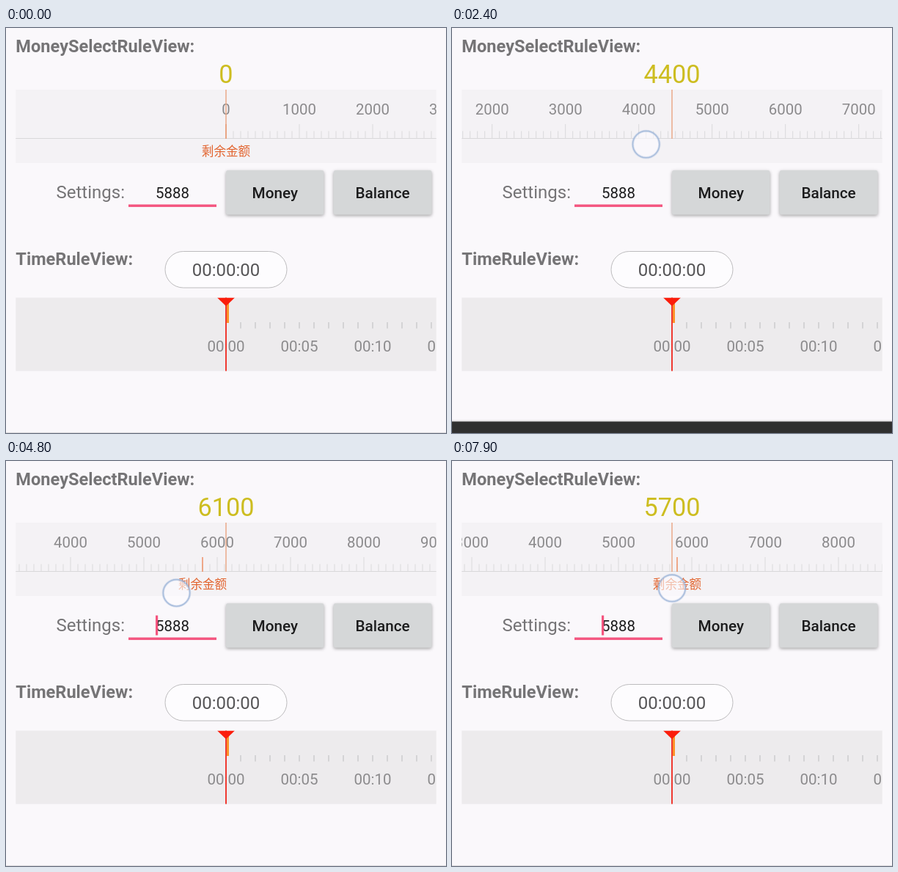
Write an HTML page with a canvas that moves like this. It is 600 px wide and 552 px high and loops after 8 s.

```html
<!DOCTYPE html>
<html lang="zh-CN">
<head>
<meta charset="utf-8">
<title>Rulers</title>
<style>
html, body { margin: 0; width: 100%; height: 100%; overflow: hidden; background: #faf8fb; }
canvas { display: block; width: 600px; height: 552px; }
</style>
</head>
<body>
<canvas id="stage"></canvas>
<script>
const W = 600, H = 552, LOOP = 8000, STEP = 100;
const LEFT = 13.3, WIDTH = 573.4, MID = 300;
const PINK = '#f4557f';
const SANS = 'Roboto, "Noto Sans", sans-serif';
const CJK = '"Noto Sans CJK SC", "Noto Sans CJK", sans-serif';

const canvas = document.getElementById('stage');
const ratio = window.devicePixelRatio || 1;
canvas.width = W * ratio;
canvas.height = H * ratio;
const ctx = canvas.getContext('2d');

// Ruler position: [time, amount]
const SCROLL = [
  [300, 0], [500, 170], [700, 960], [1000, 2250], [1300, 3365], [1600, 4275],
  [1750, 4510], [1900, 4600], [2200, 4600], [2500, 4380], [2800, 4030],
  [3000, 3920], [3100, 3900], [4100, 3900], [4300, 4130], [4600, 5380],
  [4800, 6120], [4900, 6330], [5000, 6400], [5700, 6400], [5900, 6020],
  [6200, 4950], [6400, 4260], [6500, 4060], [6600, 4000], [7300, 4000],
  [7500, 4240], [7700, 5050], [7900, 5730], [8000, 6000]
];

// Touches: from, to, x at amount, y at start and end
const TOUCHES = [
  { from: 400, to: 1600, x: 151, at: 3365, y0: 150, y1: 209 },
  { from: 2300, to: 3000, x: 250, at: 4600, y0: 160, y1: 150 },
  { from: 3200, to: 3500, x: 530.5, at: 3900, y0: 231, y1: 231 },
  { from: 4200, to: 5200, x: 232.5, at: 6120, y0: 145, y1: 203 },
  { from: 5700, to: 6500, x: 181, at: 6400, y0: 143, y1: 150 },
  { from: 7400, to: 8000, x: 300, at: 5730, y0: 145, y1: 179 }
];

// Times at which the text cursor flips, hidden at first
const BLINKS = [100, 500, 850, 1300, 1850, 2300, 2800, 3250, 3700, 4200,
  4650, 4950, 5300, 5800, 6250, 6650, 7000, 7400, 7850];

const TOASTS = [{ show: 560, hide: 2270 }, { show: 4930, hide: 6640 }];

const clamp = v => Math.max(0, Math.min(1, v));

function track(keys, t) {
  if (t <= keys[0][0]) return keys[0][1];
  for (let i = 1; i < keys.length; i++) {
    const [t0, v0] = keys[i - 1], [t1, v1] = keys[i];
    if (t <= t1) return v0 + (v1 - v0) * (t - t0) / (t1 - t0);
  }
  return keys[keys.length - 1][1];
}

// cubic-bezier(.4, 0, .2, 1)
function ease(p) {
  p = clamp(p);
  let lo = 0, hi = 1;
  for (let i = 0; i < 20; i++) {
    const s = (lo + hi) / 2, r = 1 - s;
    if (1.2 * s * r * r + 0.6 * s * s * r + s * s * s < p) lo = s; else hi = s;
  }
  return lo * lo * (3 - 2 * lo);
}

function rect(x, y, w, h, color) {
  ctx.fillStyle = color;
  ctx.fillRect(x, y, w, h);
}

function text(str, x, y, size, color, align = 'left', weight = 400, family = SANS) {
  ctx.font = `${weight} ${size}px ${family}`;
  ctx.textAlign = align;
  ctx.fillStyle = color;
  ctx.fillText(str, x, y);
}

function clipped(y, h, paint) {
  ctx.save();
  ctx.beginPath();
  ctx.rect(LEFT, y, WIDTH, h);
  ctx.clip();
  paint();
  ctx.restore();
}

function moneyRuler(amount, balance) {
  const toX = v => MID + (v - amount) / 10;
  const shown = Math.floor((amount + 0.01) / 100) * 100;
  text(String(shown), MID, 75.3, 34.3, '#cdbd20', 'center');
  clipped(84, 100, () => {
    rect(0, 84, W, 100, '#f4f2f5');
    rect(0, 150, W, 1, '#d9d8da');
    for (let v = 0; v <= 10000; v += 100) {
      const x = toX(v);
      if (x < -30 || x > W + 30) continue;
      const major = v % 1000 === 0;
      rect(x - 0.5, major ? 131 : 140.5, 1, major ? 19 : 9.5, '#dad9db');
      if (major) text(String(v), x, 118, 20.4, '#8b8a8c', 'center');
    }
    const bx = toX(balance);
    rect(bx - 0.7, 131, 1.4, 20, '#ee8a5e');
    text('剩余金额', bx, 174.3, 16.6, '#e2642f', 'center', 400, CJK);
    rect(MID - 0.7, 84, 1.4, 67, '#e9a683');
  });
}

function button(label, x, w, pressed) {
  ctx.save();
  ctx.shadowColor = pressed ? 'rgba(0,0,0,.3)' : 'rgba(0,0,0,.34)';
  ctx.shadowBlur = (pressed ? 10 : 4) * ratio;
  ctx.shadowOffsetY = (pressed ? 3 : 1.5) * ratio;
  ctx.fillStyle = pressed ? '#d0d2d4' : '#d5d7d8';
  ctx.beginPath();
  ctx.roundRect(x, 194, w, 60.5, 3);
  ctx.fill();
  ctx.restore();
  text(label, x + w / 2, 232, 20.7, '#1c1c1d', 'center', 500);
}

function settings(t) {
  text('Settings:', 68.5, 232, 24, '#757476');
  rect(167, 240.5, 120, 3.4, PINK);
  text('5888', 227, 232, 20.4, '#1c1c1d', 'center');
  if (BLINKS.filter(b => b <= t).length % 2) rect(204, 210.5, 3.2, 27, PINK);
  button('Money', 300, 133.5, false);
  button('Balance', 446.7, 133.8, t >= 3300 && t < 3600);
}

function timeRuler() {
  ctx.beginPath();
  ctx.roundRect(217, 304.5, 166, 49.5, 24.7);
  ctx.fillStyle = '#fdfcfe';
  ctx.fill();
  ctx.strokeStyle = '#bdbcbe';
  ctx.lineWidth = 1;
  ctx.stroke();
  text('00:00:00', MID, 338.3, 24, '#565557', 'center');

  clipped(367.5, 100, () => {
    rect(0, 367, W, 102, '#edebed');
    for (let x = MID; x <= W; x += 20) rect(x - 0.5, 401, 1, 8.5, '#bcbbbd');
    for (let i = 0; i < 4; i++) {
      text('00:' + String(i * 5).padStart(2, '0'), MID + i * 100, 441, 20.5, '#8b8a8c', 'center');
    }
    rect(MID, 368, 4, 34, '#fb9328');
    rect(MID - 1, 367, 2, 101, '#f03a32');
    ctx.fillStyle = '#fb1d0c';
    ctx.beginPath();
    ctx.moveTo(288, 367.5);
    ctx.lineTo(312, 367.5);
    ctx.lineTo(MID, 379);
    ctx.fill();
  });
}

function toast({ show, hide }, t) {
  if (t < show || t > hide + 250) return;
  const up = ease((t - show) / 250) - ease((t - hide) / 250);
  const alpha = ease((t - show - 70) / 180) * (1 - clamp((t - hide) / 180));
  const top = H - 78 * up;
  rect(0, top - 2, W, 2, '#e4e2e5');
  rect(0, top, W, H - top + 1, '#2f2f2f');
  ctx.globalAlpha = alpha;
  text('超出额度', 40, top + 48.5, 23.3, '#f4f4f4', 'left', 400, CJK);
  ctx.globalAlpha = 1;
}

function touch(d, t, amount) {
  if (t < d.from || t >= d.to) return;
  const x = d.x + (d.at - amount) / 10;
  const y = d.y0 + (d.y1 - d.y0) * (t - d.from) / (d.to - d.from);
  ctx.beginPath();
  ctx.arc(x, y, 18.2, 0, Math.PI * 2);
  ctx.fillStyle = 'rgba(253,252,255,.6)';
  ctx.fill();
  ctx.strokeStyle = 'rgba(150,175,215,.3)';
  ctx.lineWidth = 3.4;
  ctx.stroke();
  ctx.strokeStyle = 'rgba(150,175,212,.7)';
  ctx.lineWidth = 1.6;
  ctx.stroke();
}

function draw(t) {
  const amount = track(SCROLL, t);
  ctx.setTransform(ratio, 0, 0, ratio, 0, 0);
  rect(0, 0, W, H, '#faf8fb');
  rect(0, 551, W, 1, '#dddbde');
  text('MoneySelectRuleView:', LEFT, 33, 23.6, '#757476', 'left', 700);
  text('TimeRuleView:', LEFT, 323, 23.6, '#757476', 'left', 700);
  moneyRuler(amount, t < 3300 ? 0 : 5800);
  settings(t);
  timeRuler();
  TOASTS.forEach(s => toast(s, t));
  TOUCHES.forEach(d => touch(d, t, amount));
}

const start = performance.now();
function tick() {
  const t = (performance.now() - start) % LOOP;
  draw(Math.floor(t / STEP) * STEP);
  requestAnimationFrame(tick);
}
tick();
</script>
</body>
</html>
```
